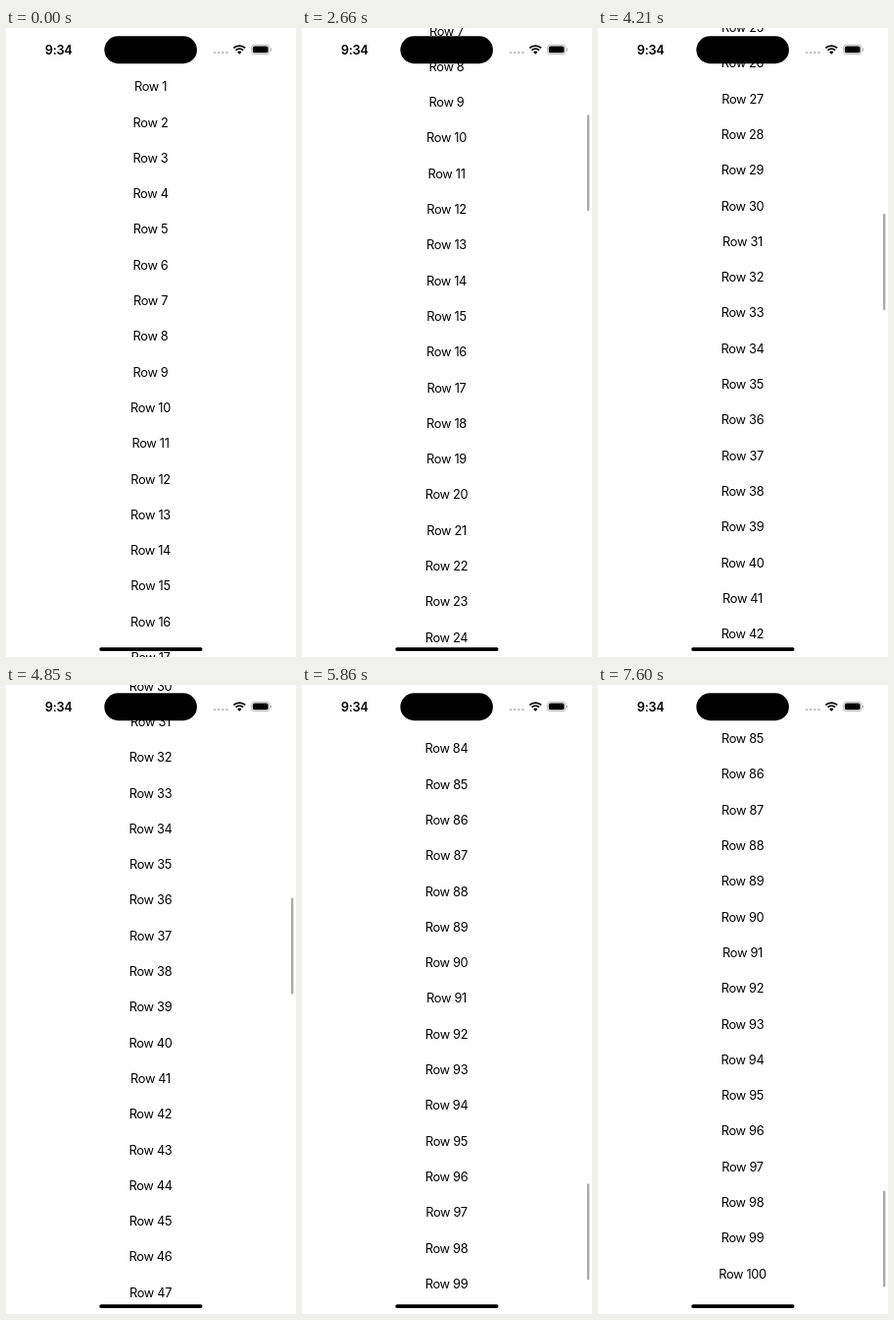
Recreate the animation shown at these times as an HTML page with a canvas. Size 296 by 640 pixels, loop 7.67 s.

```html
<!DOCTYPE html>
<html lang="en">
<head>
<meta charset="utf-8">
<title>Scrolling list</title>
<style>
  html, body { margin: 0; width: 100%; height: 100%; overflow: hidden; background: #fff; }
  canvas { display: block; }
</style>
</head>
<body>
<canvas id="stage" width="296" height="640"></canvas>
<script>
const WIDTH = 296, HEIGHT = 640, LOOP = 7670;
const ROWS = 100, PITCH = 36.3, FIRST_BASELINE = 64.2, ROW_CENTER = 147.5;
const MAX_SCROLL = 3054.2;
const ctx = document.getElementById('stage').getContext('2d');

// The picture advances in steps: [first ms, last ms, count], cut to whole hundredths.
const bursts = [
  [1980, 2660, 7], [2770, 3310, 6], [3550, 4210, 7], [4330, 4670, 4],
  [4850, 5520, 7], [5630, 6340, 7], [6450, 6570, 2], [7600, 7600, 1],
];
const steps = [0, ...bursts.flatMap(([first, last, count]) =>
  Array.from({ length: count }, (_, i) =>
    Math.floor((first + (last - first) * i / Math.max(1, count - 1)) / 10) * 10))];

// Each flick is an accelerating drag followed by an exponential coast (seconds, pixels).
const flicks = [
  { start: 1.95, from: 0, drag: 0.625, distance: 219.5 },
  { start: 3.523, from: 490.2, drag: 0.4, distance: 210.9 },
  { start: 4.835, from: 1109.9, drag: 0.3, distance: 534.4 },
];
const COAST_RATE = 2, BOUNCE_RATE = 10;

function scrollAt(t) {
  const flick = flicks.findLast(f => f.start <= t);
  if (!flick) return 0;
  const { start, from, drag, distance } = flick;
  const age = t - start;
  if (age < drag) return from + distance * (age / drag) ** 2;

  const coast = 2 * distance / drag / COAST_RATE;
  const released = from + distance;
  const position = released + coast * (1 - Math.exp(-COAST_RATE * (age - drag)));
  if (position <= MAX_SCROLL) return position;

  // Past the end: critically damped spring from the moment of impact.
  const left = 1 - (MAX_SCROLL - released) / coast;
  const sinceHit = age - drag + Math.log(left) / COAST_RATE;
  const speed = COAST_RATE * coast * left;
  return MAX_SCROLL + speed * sinceHit * Math.exp(-BOUNCE_RATE * sinceHit);
}

function pill(x, y, w, h, radius, color) {
  ctx.fillStyle = color;
  ctx.beginPath();
  ctx.roundRect(x, y, w, h, radius);
  ctx.fill();
}

function label(text, x, y, weight) {
  ctx.font = `${weight} 12.8px Inter, sans-serif`;
  ctx.letterSpacing = '-0.32px';
  ctx.textAlign = 'center';
  ctx.fillStyle = '#000';
  ctx.fillText(text, x, y);
}

function drawRows(scroll) {
  for (let n = 1; n <= ROWS; n++) {
    const y = FIRST_BASELINE + (n - 1) * PITCH - scroll;
    if (y > -5 && y < HEIGHT + 15) label(`Row ${n}`, ROW_CENTER, y, 400);
  }
}

function drawScrollbar(scroll) {
  const length = 98, top = 46.2;
  const over = Math.max(0, scroll - MAX_SCROLL);
  const y = top + Math.min(scroll, MAX_SCROLL) * 0.1533 + over;
  pill(290.9, y, 2.4, length - over, 1.2, '#aaa');
}

function drawWifi(x, y) {
  const arc = (radius, width) => {
    ctx.lineWidth = width;
    ctx.beginPath();
    ctx.arc(x, y, radius, -Math.PI * 0.74, -Math.PI * 0.26);
    ctx.stroke();
  };
  ctx.strokeStyle = '#000';
  arc(8.7, 1.8);
  arc(5.6, 1.8);
  arc(1.6, 3.2);
}

function drawStatusBar() {
  label('9:34', 53.6, 26.7, 600);
  pill(100.4, 8.3, 94.5, 27.9, 13.95, '#000');
  for (let i = 0; i < 4; i++) pill(211.7 + i * 4.1, 23.7, 2.8, 2.8, 1.4, '#c8c8c8');
  drawWifi(238.3, 26.8);

  ctx.strokeStyle = '#a8a8a8';
  ctx.lineWidth = 0.8;
  ctx.beginPath();
  ctx.roundRect(250.4, 17.2, 18.6, 9.5, 3.1);
  ctx.stroke();
  pill(251.8, 18.6, 15.8, 6.7, 1.9, '#000');
  pill(270, 20.4, 1, 3.1, 0.5, '#a8a8a8');
}

function draw() {
  const now = performance.now() % LOOP;
  const time = steps.findLast(step => step <= now);
  const scroll = scrollAt(time / 1000);

  ctx.fillStyle = '#fff';
  ctx.fillRect(0, 0, WIDTH, HEIGHT);
  drawRows(scroll);
  if (time > 0) drawScrollbar(scroll);
  drawStatusBar();
  pill(95.3, 630.2, 105.2, 3.8, 1.9, '#000');
  requestAnimationFrame(draw);
}
draw();
</script>
</body>
</html>
```
